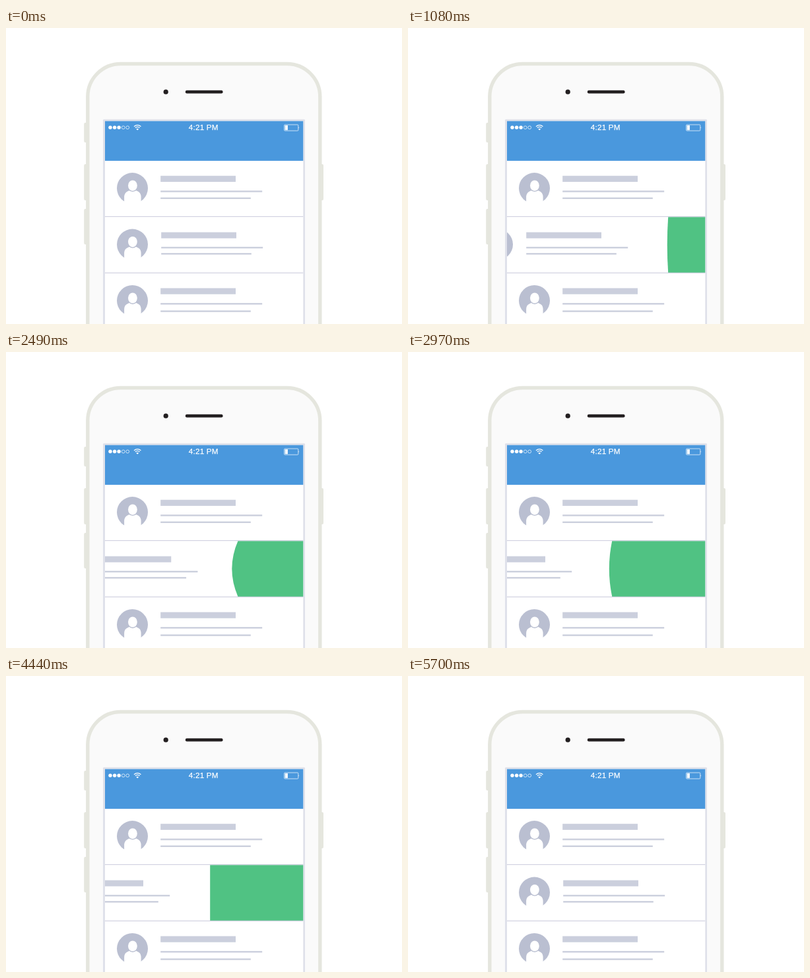
Animation of 600x450 px, one loop 6.3 s. Source, as an HTML page:

```html
<!DOCTYPE html>
<html lang="en">
<head>
<meta charset="utf-8">
<title>Elastic swipe</title>
<style>
  html, body { margin: 0; width: 100%; height: 100%; overflow: hidden; background: #fff; }
  svg { display: block; width: 600px; height: 450px; }
  text { font: 11.7px "Liberation Sans", Arial, sans-serif; letter-spacing: .2px; }
</style>
</head>
<body>
<svg viewBox="0 0 600 450">
  <defs>
    <clipPath id="screen"><rect x="150" y="141" width="300.3" height="320"/></clipPath>
    <g id="avatar">
      <circle r="23.5" fill="#babfd1"/>
      <path d="M-12.4 25V13.5C-12.4 7.5-9 5.2-4.8 3.6H5.8C10 5.2 13.1 7.5 13.1 13.5V25Z" fill="#fff"/>
      <ellipse cx=".4" cy="-4" rx="8.2" ry="9.4" fill="#babfd1"/>
      <ellipse cx=".4" cy="-4" rx="6.9" ry="8.1" fill="#fff"/>
    </g>
  </defs>

  <rect width="600" height="450" fill="#fff"/>
  <g fill="#e5e6de">
    <rect x="118.2" y="144" width="8" height="30" rx="2"/>
    <rect x="118.2" y="207" width="8" height="55" rx="2"/>
    <rect x="118.2" y="275" width="8" height="54" rx="2"/>
    <rect x="473" y="207" width="8" height="55" rx="2"/>
  </g>
  <rect x="123.8" y="54.5" width="352" height="500" rx="50" fill="#fafafa" stroke="#e5e6de" stroke-width="5.4"/>
  <circle cx="242.2" cy="97.2" r="3.6" fill="#231f20"/>
  <rect x="271.8" y="94.8" width="56.8" height="4.7" rx="2.3" fill="#231f20"/>

  <rect x="147" y="138.7" width="306" height="330" rx="1.5" fill="#dfe1ea"/>
  <rect x="150" y="141.5" width="300.3" height="320" fill="#fff"/>
  <rect x="150" y="141.5" width="300.3" height="60.4" fill="#4a98dd"/>

  <g fill="#fff">
    <circle cx="158" cy="151.3" r="2.7"/>
    <circle cx="164.6" cy="151.3" r="2.7"/>
    <circle cx="171.1" cy="151.3" r="2.7"/>
    <text x="299.3" y="155.4" text-anchor="middle" stroke="#fff" stroke-width=".25">4:21 PM</text>
    <rect x="422.7" y="148" width="4.2" height="7.2"/>
    <path d="M443.5 149.9q1.4 1.6 0 3.2z"/>
    <path d="M197.3 153.4q1.9-1.5 3.8 0l-1.9 2z"/>
  </g>
  <g fill="none" stroke="#fff">
    <circle cx="177.7" cy="151.3" r="2.4" stroke-width=".7"/>
    <circle cx="184.2" cy="151.3" r="2.4" stroke-width=".7"/>
    <path d="M194 149.8q5.2-4.4 10.4 0M195.8 151.8q3.4-2.8 6.8 0" stroke-width="1.3"/>
    <rect x="421.6" y="147" width="21.2" height="9.2" rx="1" stroke-width=".7"/>
  </g>

  <g clip-path="url(#screen)">
    <g id="rows"></g>
    <path id="action" fill="#50c283"/>
    <path d="M150 286.7h301M150 372.4h301" stroke="#d3d3e2" stroke-width="1.3"/>
  </g>
</svg>
<script>
const LOOP = 6300, EDGE = 450.2, TOP = 287.2, BOTTOM = 371.9;
const STOP_1 = 56, STOP_2 = 141;

const rowMarkup = (id, x, avatarY, titleY, line1Y, line2Y) => `
  <g id="${id}">
    <use href="#avatar" x="191.5" y="${avatarY}"/>
    <g fill="#cbcfdd">
      <rect x="${x}" y="${titleY}" width="113.8" height="9.2"/>
      <rect x="${x}" y="${line1Y}" width="154" height="2.4"/>
      <rect x="${x}" y="${line2Y}" width="136.6" height="2.4"/>
    </g>
  </g>`;

document.getElementById('rows').innerHTML =
  rowMarkup('top', 234.2, 243.6, 224.7, 247.2, 257.6) +
  rowMarkup('middle', 235.2, 329.1, 310.5, 332.7, 342.1) +
  rowMarkup('bottom', 234.2, 414.5, 395.5, 418.1, 429.4);

const middle = document.getElementById('middle');
const action = document.getElementById('action');

const progress = (t, start, end) => Math.min(1, Math.max(0, (t - start) / (end - start)));
const cubicInOut = p => p < .5 ? 4 * p ** 3 : 1 - 4 * (1 - p) ** 3;
const easeOut = p => 1 - (1 - p) ** 2.2;
const smooth = p => p * p * (3 - 2 * p);

// How far the row has been pulled to the left
function pull(t) {
  if (t >= 5100) return STOP_2 * (1 - easeOut(progress(t, 5100, 5700)));
  return STOP_1 * cubicInOut(progress(t, 0, 600)) +
    (STOP_2 - STOP_1) * cubicInOut(progress(t, 1970, 3010));
}

function glide(t, keys) {
  const i = keys.findIndex(([time]) => time > t);
  if (i < 1) return 0;
  const [t0, v0] = keys[i - 1], [t1, v1] = keys[i];
  return v0 + (v1 - v0) * smooth(progress(t, t0, t1));
}

const wobble = (t, start, end, amount) => {
  const s = t - start;
  return t > end ? 0 : amount * Math.exp(-s / 430) * Math.cos(s * Math.PI / 200);
};

// Sideways bend of the edge's centre; negative bends left
function bend(t) {
  if (t < 680) return glide(t, [[0, 0], [330, -6], [680, -3.7]]);
  if (t < 1970) return wobble(t, 680, 1440, -3.7);
  if (t < 3505) return glide(t, [[1970, 0], [2560, -9.5], [3150, -3], [3505, -6]]);
  if (t < 5100) return wobble(t, 3505, 4440, -6);
  return glide(t, [[5100, 0], [5270, 1.9], [5600, 0]]);
}

function draw(t) {
  const distance = pull(t);
  const x = EDGE - distance;
  const control = x + 2 * bend(t);
  middle.setAttribute('transform', `translate(${-distance} 0)`);
  action.setAttribute('d', distance < .02 ? '' :
    `M452 ${TOP}H${x}Q${control} ${(TOP + BOTTOM) / 2} ${x} ${BOTTOM}H452Z`);
}

const begin = performance.now();
function tick() {
  draw((performance.now() - begin) % LOOP);
  requestAnimationFrame(tick);
}
tick();
</script>
</body>
</html>
```
